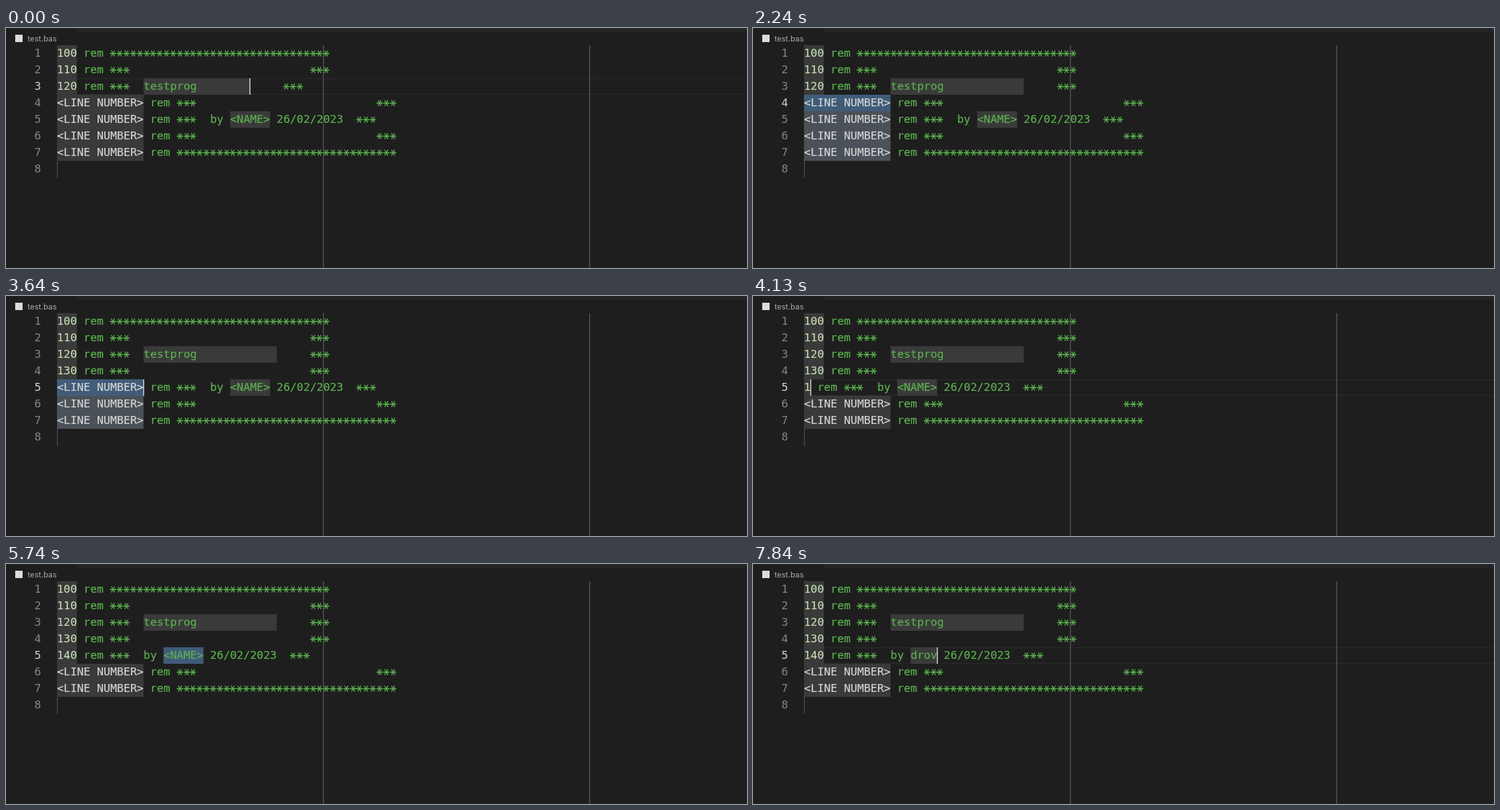
Write an HTML page that moves like this. It is 1206x392 px and loops after 8 s.

```html
<!DOCTYPE html>
<html lang="en">
<head>
<meta charset="utf-8">
<title>test.bas</title>
<style>
  html, body { margin: 0; width: 100%; height: 100%; overflow: hidden; background: #1e1e1e; }
  svg { display: block; width: 100%; height: 100%; }
  text { font: 18px "DejaVu Sans Mono", monospace; white-space: pre; stroke-width: 0.2px; }
  .rem { fill: #5bb04f; stroke: #5bb04f; }
  .num { fill: #c3dcb4; stroke: #c3dcb4; }
  .plain { fill: #d4d4d4; stroke: #d4d4d4; }
  .star { fill: #5bb04f; stroke: #5bb04f; stroke-width: 0.4px; font-size: 22px; }
  .gutter { fill: #858585; }
  .active { fill: #d0d0d0; }
  .crumb { font: 12.7px Inter, sans-serif; fill: #a9a9a9; }
</style>
</head>
<body>
<svg viewBox="0 0 1206 392" preserveAspectRatio="xMinYMin meet">
  <rect width="1206" height="392" fill="#1e1e1e"/>
  <rect x="116" width="1090" height="6" fill="#252526"/>
  <rect x="15" y="11" width="12" height="12" fill="#dcdcdc"/>
  <text class="crumb" x="35" y="22">test.bas</text>
  <g id="editor"></g>
</svg>
<script>
const LOOP = 8000;
const LEFT = 83, TOP = 28, ROW = 27, CHAR = 10.836;
const STAR = 22;
const BOX = '#3a3a3a', SELECTED = '#405c79', MATCH = '#4b5158';
const AUTHOR = 'drov', LABEL = '<LINE NUMBER>';

const padKeys = [140, 280, 420, 630];
const fields = {
  line4: { tab: 1750, keys: [2520, 2800, 3080], value: '130', label: LABEL },
  line5: { tab: 3570, keys: [4130, 4550, 4830], value: '140', label: LABEL },
  author: { tab: 5250, keys: [6090, 6440, 6650, 6790], value: AUTHOR, label: '<NAME>' }
};
const caretOff = [[1120, 1680], [2240, 2520], [5740, 6090], [7350, 7840]];

const editor = document.getElementById('editor');
const passed = (times, t) => times.filter(at => t >= at).length;
const colX = col => LEFT + col * CHAR;
const rowY = row => TOP + (row - 1) * ROW;
const escape = s => s.replace(/</g, '&lt;').replace(/>/g, '&gt;');
const rect = (x, y, w, h, fill) =>
  `<rect x="${x.toFixed(2)}" y="${y}" width="${w.toFixed(2)}" height="${h}" fill="${fill}"/>`;
const label = (x, row, s, cls) =>
  `<text class="${cls}" x="${x.toFixed(2)}" y="${rowY(row) + 19}">${escape(s)}</text>`;

// Asterisks lie on their side, centred in the row.
function stars(col, row, count) {
  const xs = Array.from({ length: count }, (_, i) =>
    (colX(col + i + 0.5) - 0.53 * STAR).toFixed(2));
  const y = rowY(row) + 13.7 - 0.301 * STAR;
  return `<text class="star" x="${xs.join(' ')}" y="${y.toFixed(2)}" rotate="90">${'*'.repeat(count)}</text>`;
}

function fieldState(f, t) {
  const typed = passed(f.keys, t);
  const selected = t >= f.tab && !typed;
  return { text: typed ? f.value.slice(0, typed) : f.label, selected, box: selected ? SELECTED : BOX };
}

function lineNumber(text, box = BOX) {
  return { text, box, cls: text === LABEL ? 'plain' : 'num' };
}

function draw(t) {
  const f4 = fieldState(fields.line4, t);
  const f5 = fieldState(fields.line5, t);
  const author = fieldState(fields.author, t);
  const matching = (f4.selected && t >= 1820) || (f5.selected && t >= 3640);
  const pending = matching ? MATCH : BOX;
  const title = { text: 'testprog'.padEnd(16 + passed(padKeys, t)), box: BOX };
  const rem = text => ({ text });
  const star = (count = 3) => ({ text: '*'.repeat(count), star: true });
  const blank = [rem(' rem '), star(), rem(' '.repeat(27)), star()];

  const lines = [
    [lineNumber('100'), rem(' rem '), star(33)],
    [lineNumber('110'), ...blank],
    [lineNumber('120'), rem(' rem '), star(), rem('  '), title, rem('     '), star()],
    [lineNumber(f4.text, f4.box), ...blank],
    [lineNumber(f5.text, f4.selected ? pending : f5.box), rem(' rem '), star(), rem('  by '),
      { text: author.text, box: author.box }, rem(' 26/02/2023  '), star()],
    [lineNumber(LABEL, pending), ...blank],
    [lineNumber(LABEL, pending), rem(' rem '), star(33)],
    []
  ];

  const active = t < fields.line4.tab ? 3 : t < fields.line5.tab ? 4 : 5;
  const selecting = f4.selected || f5.selected || author.selected;
  const focus = active === 3 ? 4 : t < fields.author.tab ? 0 : 4;
  let back = '', front = '', caretCol = 0;

  lines.forEach((parts, i) => {
    const row = i + 1;
    let col = 0;
    front += label(46.3, row, String(row), row === active ? 'active' : 'gutter');
    parts.forEach((part, k) => {
      const size = part.text.length;
      if (part.box) back += rect(colX(col), rowY(row), size * CHAR, ROW, part.box);
      if (part.star) front += stars(col, row, size);
      else if (part.text.trim()) front += label(colX(col), row, part.text, part.cls || 'rem');
      col += size;
      if (row === active && k === focus) caretCol = col;
    });
  });

  let current = '';
  if (!selecting) {
    current = rect(LEFT, rowY(active), 1206 - LEFT, 1.5, '#292929') +
      rect(LEFT, rowY(active) + ROW - 1.5, 1206 - LEFT, 1.5, '#292929');
  }
  const rulers = [40, 80].map(c => rect(colX(c) - 0.6, TOP, 1.4, 392 - TOP, '#5a5a5a')).join('');
  const finalStop = rect(LEFT, rowY(8), 1.2, 28, '#525252');
  const caretShown = !caretOff.some(([from, to]) => t >= from && t < to);
  const caret = caretShown
    ? rect(Math.floor(colX(caretCol) - 0.5), rowY(active), 2, ROW, '#b4b4b2') : '';
  return current + back + rulers + finalStop + front + caret;
}

let shown = '';
function tick(now) {
  const markup = draw(now % LOOP);
  if (markup !== shown) editor.innerHTML = shown = markup;
  requestAnimationFrame(tick);
}
tick(0);
</script>
</body>
</html>
```
